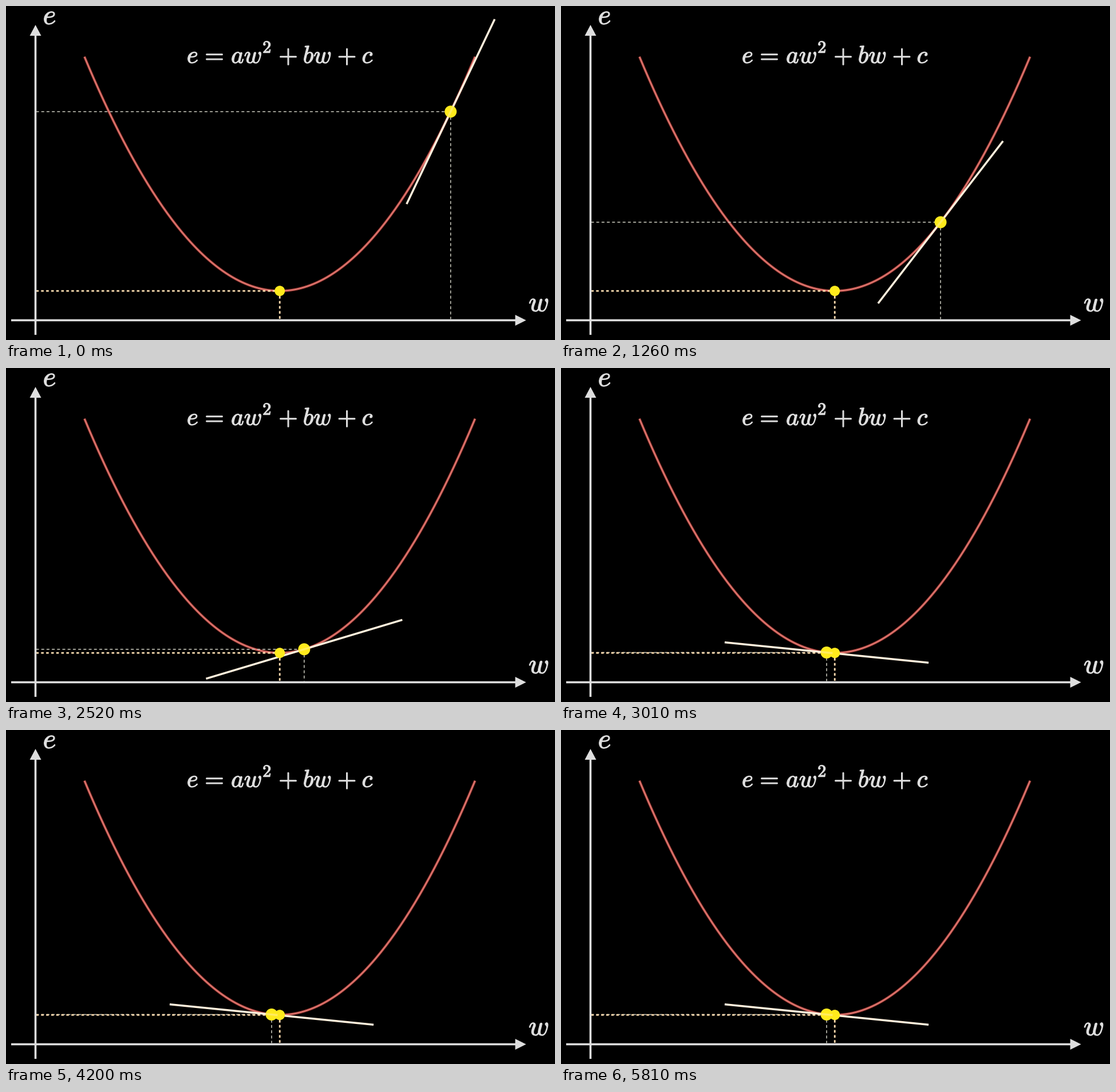
Write a matplotlib script that moves like this. It is 959 by 584 pixels and loops after 5.88 s.

```python
import numpy as np
import matplotlib.pyplot as plt
from matplotlib.animation import FuncAnimation
from matplotlib.patches import Circle, PathPatch, Polygon
from matplotlib.textpath import TextPath
from matplotlib.transforms import Affine2D

W, H, DPI = 959, 584, 64
PX = 72 / DPI                      # one pixel in points
FRAMES, INTERVAL = 84, 70

AXIS_X, AXIS_Y = 51.5, 549.5
MIN_X, MIN_Y = 478.2, 498.2
UNIT = 28.43                       # pixels per descent step
HALF_SPAN, RISE = 12, 409.5        # half width in steps, height in pixels
TANGENT = 179                      # half length of the tangent

START = 10.5
STEP_FRAMES, DELAY = 3.75, 1

GREY, RED, CREAM = "#dedede", "#d96f68", "#fff0dc"
GOLD, YELLOW, THIN = "#fbdaae", "#ffea1c", "#c4c4b8"

plt.rcParams["mathtext.fontset"] = "cm"
plt.rcParams["lines.scale_dashes"] = False
plt.rcParams["path.snap"] = False

fig = plt.figure(figsize=(W / DPI, H / DPI), dpi=DPI, facecolor="black")
ax = fig.add_axes([0, 0, 1, 1])
ax.set_xlim(0, W)
ax.set_ylim(H, 0)
ax.axis("off")


def line(xs, ys, color, width, z, dash=None, **kw):
    style = (0, tuple(d * PX for d in dash)) if dash else "-"
    return ax.plot(xs, ys, color=color, lw=width * PX, ls=style, zorder=z,
                   solid_capstyle="butt", dash_capstyle="butt", **kw)[0]


def dot(x, y, r, z):
    return ax.add_patch(Circle((x, y), r, fc=YELLOW, ec="none", zorder=z))


def math(s, left, base, size):
    """Math glyphs with the ink starting at `left`, slightly emboldened."""
    path = TextPath((0, 0), f"${s}$", size=size)
    shift = left + 0.7 - path.get_extents().x0
    path = path.transformed(Affine2D().scale(1, -1).translate(shift, base))
    ax.add_patch(PathPatch(path, fc=GREY, ec=GREY, lw=1.3 * PX, zorder=8))


def height(u):
    return MIN_Y - RISE * (u / HALF_SPAN) ** 2


def position(i):
    """Fixed-size steps downhill, then back and forth across the minimum."""
    k = max(0, int((i - DELAY) // STEP_FRAMES))
    u = START
    for _ in range(k):
        u -= np.sign(u)
    return u


# Axes
line([AXIS_X] * 2, [575, 48], GREY, 3.6, 4)
line([9, 892], [AXIS_Y] * 2, GREY, 3.6, 4)
for tri in ([(51.5, 33), (41.5, 52), (61.5, 52)],
            [(908.5, 549.5), (889.5, 540), (889.5, 559)]):
    ax.add_patch(Polygon(tri, fc=GREY, ec="none", zorder=4))

# Labels and formula
math("e", 66, 31.9, 49)
math("w", 913.5, 533.9, 49)
for s, left in (("e", 317), ("=", 349), ("aw", 394), ("+", 478),
                ("bw", 520), ("+", 580.5), ("c", 622.5)):
    math(s, left, 99.8, 43)
math("2", 449, 81.7, 30)

# Curve and its minimum
u = np.linspace(-HALF_SPAN, HALF_SPAN, 241)
line(MIN_X + u * UNIT, height(u), "#661814", 5.4, 2, alpha=0.65)
line(MIN_X + u * UNIT, height(u), RED, 3.2, 2.1)
line([AXIS_X + 1, MIN_X], [MIN_Y] * 2, GOLD, 2.8, 3, (4.6, 4.2))
line([MIN_X] * 2, [MIN_Y, AXIS_Y - 2], GOLD, 2.8, 3, (4.6, 4.2))
dot(MIN_X, MIN_Y, 9, 5)

# Moving parts
across = line([], [], THIN, 1.6, 2.5, (5, 4.2))
down = line([], [], THIN, 1.6, 2.5, (5, 4.2))
tangent = line([], [], CREAM, 3.5, 4.5)
ball = dot(0, 0, 10.5, 6)
sheen = line([], [], CREAM, 3.5, 7, alpha=0.35)


def update(i):
    u = position(i)
    x, y = MIN_X + u * UNIT, height(u)
    slope = -2 * RISE * u / HALF_SPAN ** 2 / UNIT
    step = np.array([1, slope]) / np.hypot(1, slope)
    (x0, x1), (y0, y1) = zip(*((x, y) + s * TANGENT * step for s in (-1, 1)))
    across.set_data([AXIS_X + 1, x], [y, y])
    down.set_data([x, x], [y, AXIS_Y - 2])
    tangent.set_data([x0, x1], [y0, y1])
    r = 10.5 * step
    sheen.set_data([x - r[0], x + r[0]], [y - r[1], y + r[1]])
    ball.center = x, y
    return across, down, tangent, ball, sheen


anim = FuncAnimation(fig, update, frames=FRAMES, interval=INTERVAL,
                     repeat=True, repeat_delay=0, blit=False)
plt.show()
```
